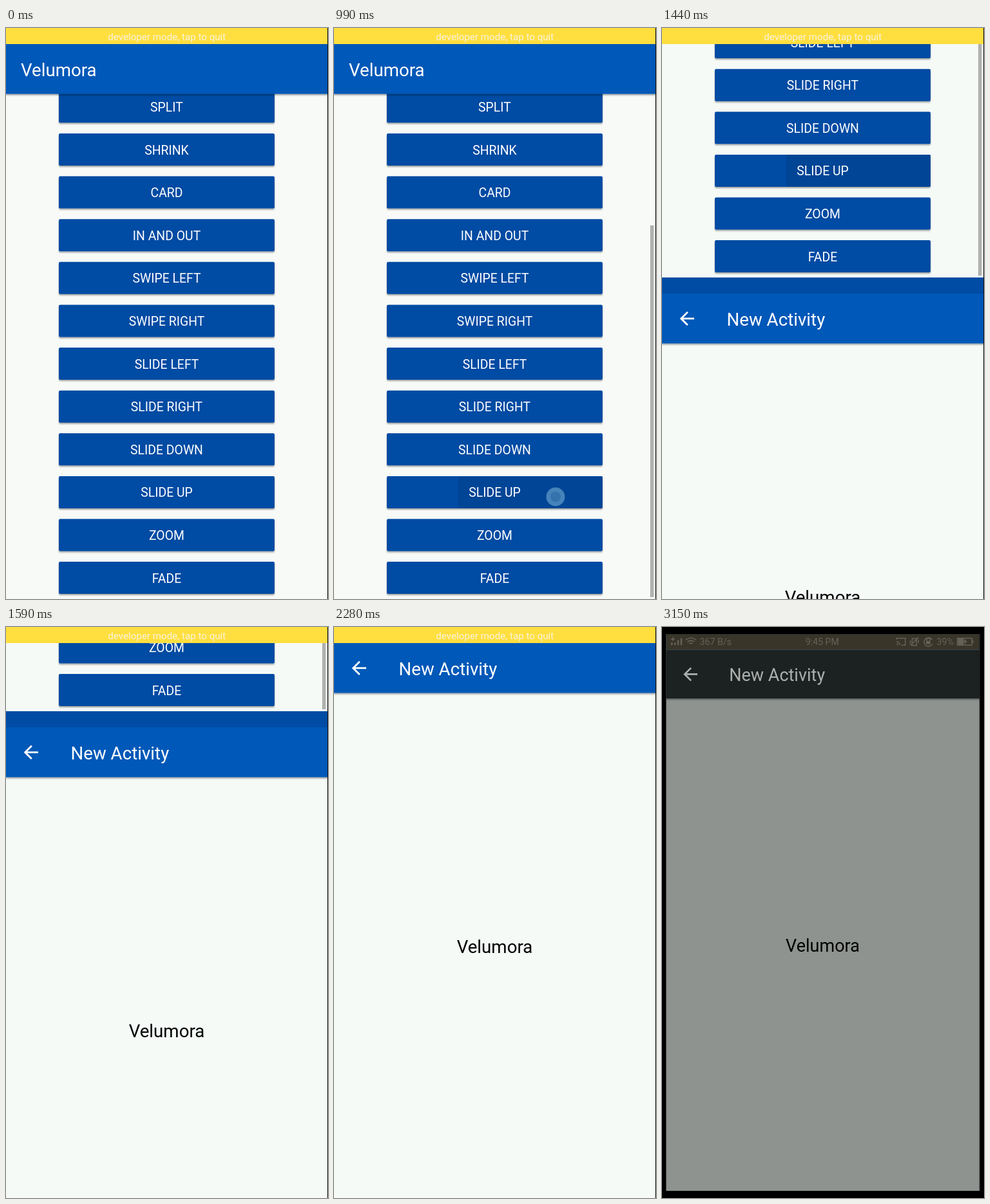
An HTML page that plays this animation: 500 px wide and 888 px high, repeating every 3.18 s.

```html
<!DOCTYPE html>
<html lang="en">
<head>
<meta charset="utf-8">
<title>Slide up transition</title>
<style>
  html, body { margin: 0; width: 100%; height: 100%; overflow: hidden; background: #000; }
  svg { display: block; width: 500px; height: 888px; }
  text { font-family: Roboto, "Noto Sans", sans-serif; }
</style>
</head>
<body>
<svg id="root" viewBox="0 0 500 888">
  <defs>
    <filter id="lift" x="-5%" y="-20%" width="110%" height="150%">
      <feDropShadow dx="0" dy="2" stdDeviation="1.3" flood-color="#000" flood-opacity=".36"/>
    </filter>
    <clipPath id="screen"><rect width="500" height="888"/></clipPath>
  </defs>
</svg>
<script>
const LOOP = 3180, STEP = 30, W = 500, H = 888;
const BAR = 25, TOOL = 77.5;
const LABELS = ['SPLIT', 'SHRINK', 'CARD', 'IN AND OUT', 'SWIPE LEFT', 'SWIPE RIGHT',
  'SLIDE LEFT', 'SLIDE RIGHT', 'SLIDE DOWN', 'SLIDE UP', 'ZOOM', 'FADE'];
const APP = 'Velumora';
const root = document.getElementById('root');

function add(parent, tag, attrs, text) {
  const el = document.createElementNS('http://www.w3.org/2000/svg', tag);
  for (const k in attrs) el.setAttribute(k, attrs[k]);
  if (text) el.textContent = text;
  parent.appendChild(el);
  return el;
}
const rect = (p, x, y, width, height, fill, more) =>
  add(p, 'rect', { x, y, width, height, fill, ...more });
const label = (p, x, y, size, fill, str, anchor = 'start') =>
  add(p, 'text', { x, y, 'font-size': size, fill, 'text-anchor': anchor }, str);

// A screen with its background, status strip and toolbar
function makePage(title, titleX, body) {
  const g = add(stage, 'g', {});
  const bg = rect(g, 0, 0, W, H, '#f8faf8');
  body(g);
  const tool = rect(g, 0, BAR, W, TOOL, '#0058b8', { filter: 'url(#lift)' });
  rect(g, 0, 0, W, BAR, '#004ba3');
  return { g, bg, tool, title: label(g, titleX, 75, 27.7, '#fff', title) };
}

const stage = add(root, 'g', { 'clip-path': 'url(#screen)' });
let ripple, scroller, touch;

const list = makePage(APP, 23, g => {
  LABELS.forEach((name, i) => {
    const y = 97.3 + 66.62 * i;
    rect(g, 82, y, 335, 50, '#004ba3', { rx: 2, filter: 'url(#lift)' });
    if (name === 'SLIDE UP') ripple = rect(g, 193, y, 224, 50, '#004596', { rx: 2 });
    label(g, 249.5, y + 32.6, 19.4, '#fff', name, 'middle');
  });
  scroller = rect(g, 491, 307, 5.5, 578, '#b0b1b0');
  touch = add(g, 'g', {});
  add(touch, 'circle', { cx: 344, cy: 729, r: 14.5, fill: '#4583ba' });
  add(touch, 'circle', { cx: 344, cy: 729, r: 8, fill: '#3573ad' });
});

const detail = makePage('New Activity', 100.5, g =>
  label(g, 249.5, 507, 27.7, '#000', APP, 'middle'));
const arrow = add(detail.g, 'path', {
  d: 'M20 11H7.83l5.59-5.59L12 4l-8 8 8 8 1.41-1.41L7.83 13H20z',
  transform: 'translate(22.2 47.3) scale(1.389)', fill: '#fff'
});

const strip = rect(stage, 0, 0, W, BAR, '#ffdf3f');
rect(stage, 499, 0, 1, H, '#111');
const notice = label(stage, 249.8, 19, 15.15, '#f8f3df', 'developer mode, tap to quit', 'middle');

// System status bar
const status = add(stage, 'g', {});
const line = d => add(status, 'path', { d, fill: 'none', stroke: 'currentColor', 'stroke-width': 1.6 });
const sysText = (x, str) => label(status, x, 17.3, 14.6, 'currentColor', str);
sysText(53.5, '367 B/s');
sysText(222, '9:45 PM');
sysText(431, '39%');
[4, 4, 8, 11].forEach((h, i) => rect(status, 8 + i * 5, 17.5 - h, 2.6, h, 'currentColor'));
line('M8 8h6M11 5v6');
line('M31 9.5Q39.5 2.5 48 9.5M34 12.5Q39.5 8 45 12.5M37 15.3Q39.5 13.5 42 15.3');
line('M367 9V6.5H381V17.5H375M367 12a5.5 5.5 0 0 1 5.5 5.5M367 15.5a2 2 0 0 1 2 2');
line('M389 10v5M392 7h7v11h-7zM402 9v5M389 18L402 5.5');
line('M424 9a7 7 0 1 0 0 7M415 11V9a2.6 2.6 0 0 1 5.2 0v2');
rect(status, 414, 11, 7, 5, 'currentColor');
line('M464 6.5H487V17.5H464zM489 10v4');
rect(status, 465, 7, 9, 10, 'currentColor');
add(status, 'path', { d: 'M477 7.5l-4 5.5h3l-1 4l5-6h-3z', fill: 'currentColor' });

const clamp = (t, a, b) => Math.min(1, Math.max(0, (t - a) / (b - a)));
const ease = x => 0.5 - 0.5 * Math.cos(Math.PI * x);
const show = (el, on) => el.setAttribute('visibility', on ? 'visible' : 'hidden');
const mix = (a, b, k) => 'rgb(' + a.map((v, i) => Math.round(v + (b[i] - v) * k)) + ')';

function draw(t) {
  const shift = Math.round(H * ease(clamp(t, 1051, 1771)));
  list.g.setAttribute('transform', `translate(0 ${-shift})`);
  detail.g.setAttribute('transform', `translate(0 ${H - shift})`);

  const down = t >= 900;
  show(scroller, down);
  show(ripple, down);
  show(touch, down && t < 1050);

  show(notice, t < 2700);
  status.setAttribute('opacity', clamp(t, 2740, 2860));

  // Closing: the screen shrinks a little and turns dark
  const k = ease(clamp(t, 2910, 3150));
  const s = 1 - 0.025 * k;
  stage.setAttribute('transform', `translate(249.5 444) scale(${s}) translate(-249.5 -444)`);
  const tint = t >= 1350 && t < 2400 ? [245, 250, 247] : [248, 250, 248];
  const paper = mix(tint, [142, 147, 143], k);
  const ink = mix([255, 255, 255], [172, 175, 173], k);
  list.bg.setAttribute('fill', paper);
  detail.bg.setAttribute('fill', paper);
  detail.tool.setAttribute('fill', mix([0, 88, 184], [27, 34, 35], k));
  detail.title.setAttribute('fill', ink);
  arrow.setAttribute('fill', ink);
  strip.setAttribute('fill', mix([255, 223, 63], [57, 53, 41], k));
  status.setAttribute('color', mix([255, 250, 230], [100, 97, 87], k));
}

// The picture advances in steps of 30 ms
function tick() {
  const t = performance.now() % LOOP;
  draw(t - t % STEP);
  requestAnimationFrame(tick);
}
tick();
</script>
</body>
</html>
```
